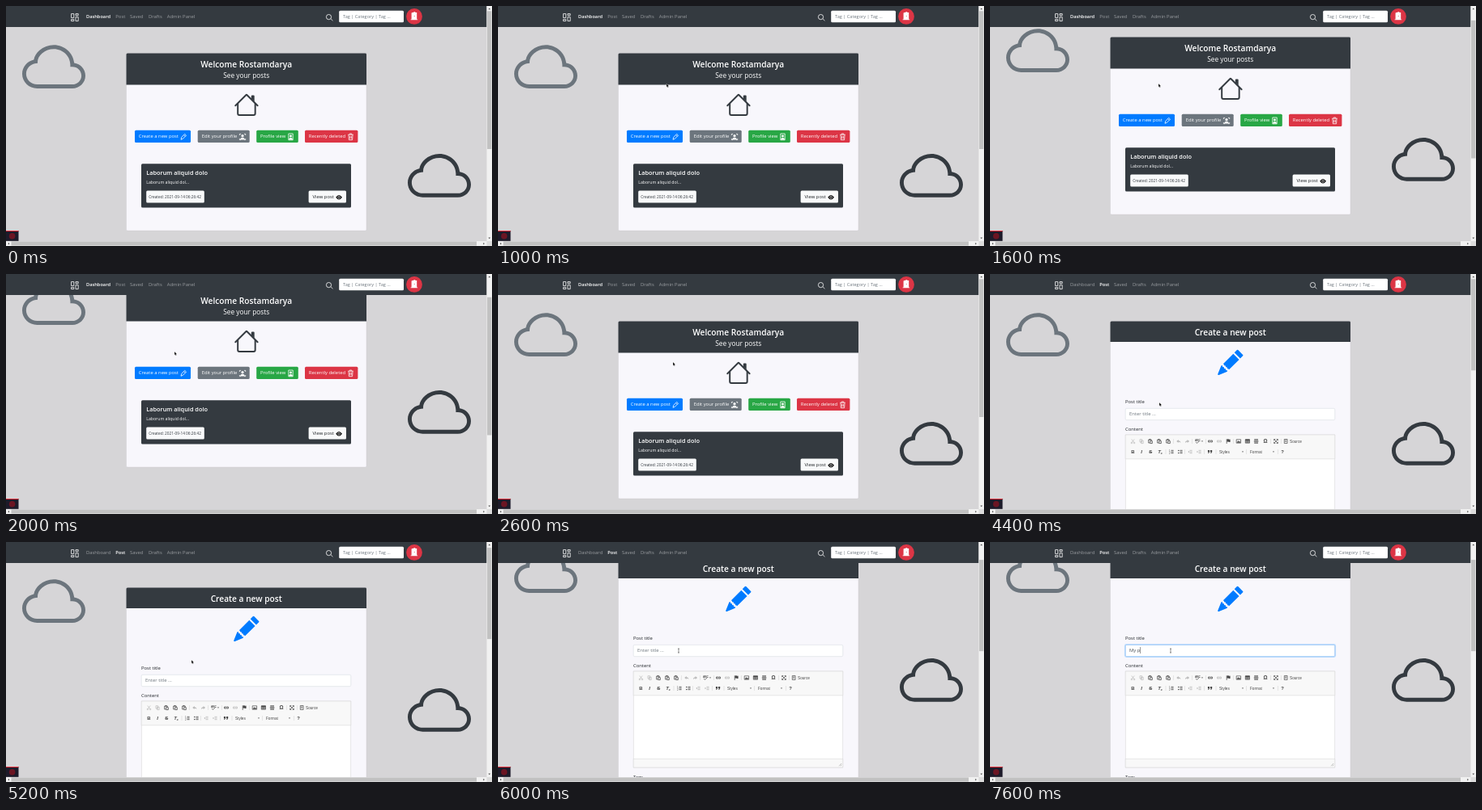
Animation, 600 px wide and 297 px high, one loop 8000 ms. Source, as an HTML page:

```html
<!DOCTYPE html>
<html lang="en">
<head>
<meta charset="utf-8">
<title>Dashboard</title>
<style>
html, body { margin: 0; width: 100%; height: 100%; overflow: hidden; background: #d6d5d7; }
svg { display: block; }
.stage { width: 600px; height: 297px; font: 5.88px "Open Sans", "Noto Sans", sans-serif; animation: play 8s step-end infinite; }

.one { visibility: var(--one); }
.two { visibility: var(--two); }
.page { transform: translateY(calc(var(--y) * -1px)); }
.thumb { fill: #c1c1c1; transform: translateY(calc(var(--y) * var(--k) * 1px)); }
.cursor { transform: translate(var(--at)); }
.arrow { visibility: var(--arrow); }
.hand { visibility: var(--hand); }
.beam { visibility: var(--beam); }
.create { fill: var(--blue); }
.ring { opacity: var(--ring); }
.focus { opacity: var(--focus); }

.dark { fill: #343a40; }
.white { fill: #fff; }
.card { fill: #f8f7fc; }
.muted { fill: #9a9da0; }
.grey { fill: #6c757d; }
.mid { text-anchor: middle; }
.bold { font-weight: 600; }
.h3 { font-size: 10.2px; font-weight: 600; }
.line { fill: none; stroke: currentColor; stroke-width: .8; }
.off { opacity: .35; }
.tools { color: #484848; fill: #484848; font: 4.7px "Liberation Sans", Arial, sans-serif; }
.tools .line { stroke-width: .7; }
.title { line-height: 14.4px; white-space: pre; }
.title::before { content: var(--text); color: var(--ink); box-shadow: var(--caret); }

@keyframes play {
  0% {
    --y: 0; --one: visible; --two: hidden;
    --arrow: hidden; --hand: hidden; --beam: hidden; --at: 187px, 140px;
    --blue: #007bff; --ring: 0; --focus: 0;
    --text: "Enter title ..."; --ink: #6c757d; --caret: none;
  }
  7.5% { --arrow: visible; }
  10% { --at: 199px, 112px; }
  12.5% { --at: 208px, 96px; }
  20% { --y: 20; }
  22.5% { --y: 37; }
  25% { --y: 39; }
  30% { --y: 17; --at: 210px, 98px; }
  32.5% { --y: 0; --at: 216px, 109px; }
  35% { --at: 215px, 120px; }
  37.5% { --at: 212px, 138px; }
  40% { --at: 208px, 156px; --arrow: hidden; --hand: visible; --blue: #0069d9; }
  42.5% { --at: 206px, 160px; }
  45% { --ring: 1; }
  50% { --one: hidden; --two: visible; --arrow: visible; --hand: hidden; }
  55% { --at: 209px, 159px; }
  57.5% { --at: 216px, 154px; }
  60% { --at: 224px, 149px; }
  62.5% { --at: 229px, 146px; }
  65% { --y: 2; }
  67.5% { --y: 39; }
  70% { --at: 227px, 141px; }
  72.5% { --at: 224px, 136px; --arrow: hidden; --beam: visible; }
  75% { --at: 223px, 134.5px; }
  80% { --focus: 1; --caret: -.5px 0 #333; }
  85% { --caret: none; }
  87.5% { --text: "M"; --ink: #495057; --caret: .5px 0 #333; }
  90% { --text: "My"; }
  92.5% { --text: "My "; }
  95% { --text: "My p"; }
}
</style>
</head>
<body>
<svg class="stage" viewBox="0 0 600 297">
  <defs>
    <path id="cloud" transform="scale(4.875)" d="M4.406 3.342A5.53 5.53 0 0 1 8 2c2.69 0 4.923 2 5.166 4.579C14.758 6.804 16 8.137 16 9.773 16 11.569 14.502 13 12.687 13H3.781C1.708 13 0 11.366 0 9.318c0-1.763 1.266-3.223 2.942-3.593.143-.863.698-1.723 1.464-2.383zm.653.757c-.757.653-1.153 1.44-1.153 2.056v.448l-.445.049C2.064 6.805 1 7.952 1 9.318 1 10.785 2.23 12 3.781 12h8.906C13.98 12 15 10.988 15 9.773c0-1.216-1.02-2.228-2.313-2.228h-.5v-.5C12.188 4.825 10.328 3 8 3a4.53 4.53 0 0 0-2.941 1.1z"/>
    <g id="paste"><path class="line" d="M-1 2H-2.3V-2H1.3V-.8"/><path d="M-1.4-2.8h1.8v1.2h-1.8z"/><path class="line" d="M-.3-.3H2.3V2.6H-.3z"/></g>
    <path id="undo" d="M-2.5 0 0-2V-.7Q2.6-.7 2.6 2 1.6.7 0 .8V2z"/>
    <path id="drop" d="M-1.1-.6H1.1L0 .7z"/>
    <path id="rows" class="line" d="M-.5-1.7H2.6M-.5 0H2.6M-.5 1.7H2.6"/>
    <path id="link" class="line" d="M-.4-1H-2.4V1H-.4M.4-1H2.4V1H.4M-1.2 0H1.2"/>
    <path id="bar" stroke="#c8c8c8" stroke-width=".4" d="M0-3V3"/>
  </defs>

  <rect width="600" height="297" fill="#d6d5d7"/>

  <g class="page">
    <use href="#cloud" x="20" y="38.5" class="grey"/>
    <use href="#cloud" x="496" y="173.3" class="dark"/>

    <g class="one">
      <rect class="card" x="148.5" y="58.5" width="296.5" height="219.5" rx="1.5" stroke="#c9c8cc" stroke-width=".4"/>
      <path class="dark" d="M148.5 97.5V60a1.5 1.5 0 0 1 1.5-1.5H443.5A1.5 1.5 0 0 1 445 60V97.5z"/>
      <g class="white mid">
        <text class="h3" x="296.7" y="75.8">Welcome Rostamdarya</text>
        <text x="296.7" y="89.2" font-size="8.35">See your posts</text>
      </g>
      <g class="dark" transform="translate(281.3 106.6) scale(1.953)">
        <path d="M2 13.5V7h1v6.5a.5.5 0 0 0 .5.5h9a.5.5 0 0 0 .5-.5V7h1v6.5a1.5 1.5 0 0 1-1.5 1.5h-9A1.5 1.5 0 0 1 2 13.5zm11-11V6l-2-2V2.5a.5.5 0 0 1 .5-.5h1a.5.5 0 0 1 .5.5z"/>
        <path d="M7.293 1.5a1 1 0 0 1 1.414 0l6.647 6.646a.5.5 0 0 1-.708.708L8 2.207 1.354 8.854a.5.5 0 1 1-.708-.708z"/>
      </g>

      <rect class="ring" x="157.9" y="152.7" width="71.2" height="17.3" rx="2.4" fill="#007bff" fill-opacity=".5"/>
      <rect class="create" x="159" y="153.8" width="69" height="15.1" rx="1.5"/>
      <rect x="236.7" y="153.8" width="64" height="15.1" rx="1.5" fill="#6c757d"/>
      <rect x="309.2" y="153.8" width="51.6" height="15.1" rx="1.5" fill="#28a745"/>
      <rect x="369" y="153.8" width="65.4" height="15.1" rx="1.5" fill="#dc3545"/>
      <g class="white">
        <text x="163.8" y="163.4">Create a new post</text>
        <text x="241.7" y="163.4">Edit your profile</text>
        <text x="314" y="163.4">Profile view</text>
        <text x="373.8" y="163.4">Recently deleted</text>
      </g>
      <g class="white" color="#fff">
        <path class="line" d="M216 165.3l.7-2.8 4-4.1 1.8 1.7-4 4.1zM219.6 159.6l1.8 1.7"/>
        <path class="line" d="M288.4 160v-1.6h1.7M294 158.4h1.7v1.6M295.7 164v1.6h-1.7M290.1 165.6h-1.7v-1.6"/>
        <circle cx="292" cy="160.7" r="1.6"/><path d="M289.2 165.4q.2-2.6 2.8-2.6t2.8 2.6z"/>
        <path class="line" d="M348.8 158h5.4v7.8h-5.4z"/>
        <circle cx="351.5" cy="161" r="1.4"/><path d="M349 165.5q.2-2.4 2.5-2.4t2.5 2.4z"/>
        <path class="line" d="M422.2 159.2h6.6M424.3 159v-1h2.4v1M423 159.4l.4 6.3h4.2l.4-6.3M424.7 160.8v3.4M426.3 160.8v3.4" stroke-width=".6"/>
      </g>

      <rect class="dark" x="167" y="195.2" width="259" height="54.4" rx="1.5"/>
      <g class="white">
        <text class="bold" x="173.2" y="209.4" font-size="7.35">Laborum aliquid dolo</text>
        <text x="173.2" y="220.2" font-size="5.2">Laborum aliquid dol...</text>
      </g>
      <g fill="#f8f9fa">
        <rect x="173.2" y="228.5" width="71.6" height="15" rx="1.5"/>
        <rect x="373.6" y="228.5" width="46.4" height="15" rx="1.5"/>
      </g>
      <text class="dark" x="176.2" y="237.7" font-size="4.75">Created: 2021-09-14 06:26:42</text>
      <text x="378.6" y="238.2" fill="#212529">View post</text>
      <path d="M407.2 236.8q3.8-5.6 7.8 0-4 5.6-7.8 0z" fill="#111"/>
      <circle cx="411.1" cy="236.8" r="1.4" stroke="#f8f9fa" stroke-width=".6" fill="#111"/>
    </g>

    <g class="two">
      <rect class="card" x="148.5" y="58.5" width="296.5" height="500" rx="1.5" stroke="#c9c8cc" stroke-width=".4"/>
      <path class="dark" d="M148.5 84V60a1.5 1.5 0 0 1 1.5-1.5H443.5A1.5 1.5 0 0 1 445 60V84z"/>
      <text class="h3 white mid" x="296.7" y="75.6">Create a new post</text>
      <path fill="#007bff" transform="translate(281.2 93.8) scale(1.953)" d="M12.854.146a.5.5 0 0 0-.707 0L10.5 1.793 14.207 5.5l1.647-1.646a.5.5 0 0 0 0-.708zM13.5 6.207 9.793 2.5 3.293 9H3.5a.5.5 0 0 1 .5.5v.5h.5a.5.5 0 0 1 .5.5v.5h.5a.5.5 0 0 1 .5.5v.5h.5a.5.5 0 0 1 .5.5v.207zM6.032 13.675A.5.5 0 0 1 6 13.5V13h-.5a.5.5 0 0 1-.5-.5V12h-.5a.5.5 0 0 1-.5-.5V11h-.5a.5.5 0 0 1-.5-.5V10h-.5a.5.5 0 0 1-.175-.032l-.179.178a.5.5 0 0 0-.11.168l-2 5a.5.5 0 0 0 .65.65l5-2a.5.5 0 0 0 .168-.11z"/>
      <g fill="#212529">
        <text x="167" y="160.2">Post title</text>
        <text x="167" y="193.6">Content</text>
        <text x="167" y="331.6">Tags</text>
      </g>

      <rect class="focus" x="165.9" y="165.1" width="261.2" height="16.8" rx="2.4" fill="#bfdeff"/>
      <rect class="white" x="167.2" y="166.3" width="258.6" height="14.4" rx="1.5" stroke="#ced4da" stroke-width=".5"/>
      <rect class="focus" x="167.2" y="166.3" width="258.6" height="14.4" rx="1.5" fill="none" stroke="#80bdff" stroke-width=".6"/>
      <foreignObject x="172" y="166.2" width="240" height="14.4"><div class="title"></div></foreignObject>

      <rect class="white" x="167.2" y="199" width="258.6" height="119" stroke="#d1d1d1" stroke-width=".5"/>
      <path fill="#f8f8f8" stroke="#d1d1d1" stroke-width=".5" d="M167.2 199h258.6v29.8H167.2zM167.2 307.4h258.6V318H167.2z"/>
      <path stroke="#888" stroke-width=".5" d="M421 316.2l3.2-3.2M422.8 316.2l1.4-1.4"/>

      <g class="tools" transform="translate(0 207)">
        <g class="off">
          <path class="line" d="M174.8-2.5l3 4M178.2-2.5l-3 4"/><circle class="line" cx="174.9" cy="2" r=".8"/><circle class="line" cx="178.1" cy="2" r=".8"/>
          <path class="line" d="M185-2.3h2.6v3.4H185zM186.6-.8h2.6v3.4h-2.6z"/>
          <use href="#undo" x="232.7"/>
          <use href="#undo" transform="translate(243.6) scale(-1 1)"/>
          <use href="#link" x="283"/>
        </g>
        <use href="#paste" x="198"/><use href="#paste" x="209"/><use href="#paste" x="220"/>
        <text x="253" y=".3" font-size="3.2" font-weight="700">ABC</text>
        <path class="line" d="M254 1l1.5 1.4 3-2.8"/>
        <use href="#drop" x="262"/>
        <use href="#link" x="272"/>
        <path d="M291.8-2.7h.7v5.6h-.7zM292.7-2.5q1.3-.7 2.2 0t1.7 0V.7q-.9.6-1.8 0t-2.1 0z"/>
        <path class="line" d="M304.2-2.2h5.4v4.4h-5.4z"/><path d="M304.6 1.8l1.8-2.5 1.1 1.3.8-.8 1 2z"/>
        <path class="line" d="M315.3-2.2h5.2v4.4h-5.2zM315.3-.2h5.2M315.3 1h5.2M317-2v4M318.8-2v4"/><path d="M315.2-2.4h5.4v1.4h-5.4z"/>
        <path class="line" d="M326.2-2.4h4.8M326.2-1.2h4.8M326.2 1.2h4.8M326.2 2.4h4.8" stroke-width=".5"/><path d="M325.8-.5h5.6v1h-5.6z"/>
        <text x="340" y="2.3" class="mid" font-size="6.3" font-weight="700">Ω</text>
        <path class="line" d="M350.6-.8v-1.7h1.7M353.7-2.5h1.7v1.7M355.4.8v1.7h-1.7M352.3 2.5h-1.7V.8M351-2.1l4 4.2M355-2.1l-4 4.2"/>
        <path class="line" d="M363.3-2.5h3.8v5h-3.8zM364.2-1h2M364.2.3h2"/>
        <text x="370" y="1.6">Source</text>
        <use href="#bar" x="226.5"/><use href="#bar" x="249.5"/><use href="#bar" x="266.5"/><use href="#bar" x="300.5"/><use href="#bar" x="346.5"/><use href="#bar" x="359.5"/>
      </g>
      <g class="tools" transform="translate(0 220)">
        <g class="mid" font-size="6" font-weight="700">
          <text x="176.3" y="2.2">B</text>
          <text x="187.2" y="2.2" font-style="italic">I</text>
          <text x="198.2" y="2.2" text-decoration="line-through">S</text>
          <text x="210" y="2.2" font-style="italic">T<tspan font-size="3.5" dy=".6">x</tspan></text>
          <text x="361" y="2.2">?</text>
        </g>
        <use href="#rows" x="224"/><text x="221" y="-.3" font-size="2.7">1</text><text x="221" y="2.6" font-size="2.7">2</text>
        <use href="#rows" x="235"/><circle cx="232.8" cy="-1.5" r=".8"/><circle cx="232.8" cy="1.5" r=".8"/>
        <g class="off">
          <use href="#rows" x="247"/><path d="M246-1.2v2.4L244.4 0z"/>
          <use href="#rows" x="258"/><path d="M255.5-1.2v2.4l1.6-1.2z"/>
        </g>
        <path d="M268.9-2h2.2v2.1l-1.1 2h-.8l.5-1.9h-.8zM272-2h2.2v2.1l-1.1 2h-.8l.5-1.9H272z"/>
        <text x="283" y="1.6">Styles</text><use href="#drop" x="312"/>
        <text x="321" y="1.6">Format</text><use href="#drop" x="350"/>
        <use href="#bar" x="217"/><use href="#bar" x="240.5"/><use href="#bar" x="264.5"/><use href="#bar" x="279"/><use href="#bar" x="316.5"/><use href="#bar" x="355.5"/>
      </g>
    </g>
  </g>

  <rect class="dark" width="593.5" height="26"/>
  <path class="line" color="#fff" stroke-width="1" d="M80.6 9.6h3.2v5h-3.2zM80.6 16.6h3.2v2h-3.2zM86 9.6h3.2v2H86zM86 13.6h3.2v5H86z"/>
  <g class="one">
    <text class="white bold" x="99" y="15.4" font-size="5.7">Dashboard</text>
    <text class="muted" x="135.3" y="15.4">Post</text>
  </g>
  <g class="two">
    <text class="muted" x="99" y="15.4">Dashboard</text>
    <text class="white bold" x="135.3" y="15.4" font-size="5.7">Post</text>
  </g>
  <g class="muted">
    <text x="153" y="15.4">Saved</text>
    <text x="176" y="15.4">Drafts</text>
    <text x="198.7" y="15.4">Admin Panel</text>
  </g>
  <path class="line" color="#fff" d="M401.2 16l2.2 2.2M395.4 13.6a3.1 3.1 0 1 0 6.2 0a3.1 3.1 0 1 0-6.2 0z"/>
  <rect class="white" x="411.2" y="5.8" width="79.8" height="14.4" rx="1.5"/>
  <text class="grey" x="416" y="15.3" font-size="5.6">Tag | Category | Tag ...</text>
  <circle cx="504" cy="12.9" r="9.9" fill="#dc3545"/>
  <path class="white" d="M500.6 8.6l4.6-1.6v.9h2v8.6h1v.8h-8.6v-.8h1z"/>
  <circle cx="504.2" cy="12.6" r=".5" fill="#dc3545"/>

  <rect y="278" width="15.5" height="12.8" fill="#1d1b2a"/>
  <rect y="278" width="15.5" height="1" fill="#e02a36"/>
  <circle cx="7.6" cy="284.8" r="3.8" fill="#6b1523"/>

  <path fill="#f1f1f1" d="M593.5 0H600V297H0V291H593.5z"/>
  <rect x="593.5" y="291" width="6.5" height="6" fill="#dcdcdc"/>
  <rect x="6.5" y="291.4" width="574.5" height="5.2" fill="#c1c1c1"/>
  <g class="one"><rect class="thumb" style="--k:.575" x="594.1" y="6.3" width="5.3" height="170.7"/></g>
  <g class="two"><rect class="thumb" style="--k:.405" x="594.1" y="6.3" width="5.3" height="113"/></g>
  <path fill="#505050" d="M595.4 4.2h2.8l-1.4-1.6zM595.4 286.6h2.8l-1.4 1.6zM4 292.7v2.8l-1.6-1.4zM589.3 292.7v2.8l1.6-1.4z"/>

  <g class="cursor">
    <path class="arrow" fill="#000" stroke="#fff" stroke-width=".25" d="M0 0V4.4L1 3.5 1.7 5.1 2.4 4.8 1.7 3.2H3.1z"/>
    <path class="hand" fill="#fff" stroke="#111" stroke-width=".35" d="M-.6.4q.5-.7 1 0V2.1L2.3 2.6Q2.7 2.8 2.6 3.4L2.2 5.1H-.4L-1.8 3.2Q-1.6 2.5-.6 3.2z"/>
    <path class="beam line" color="#222" style="stroke-width:.5" d="M-1-2.5H1M0-2.5V2.5M-1 2.5H1"/>
  </g>
</svg>
</body>
</html>
```
